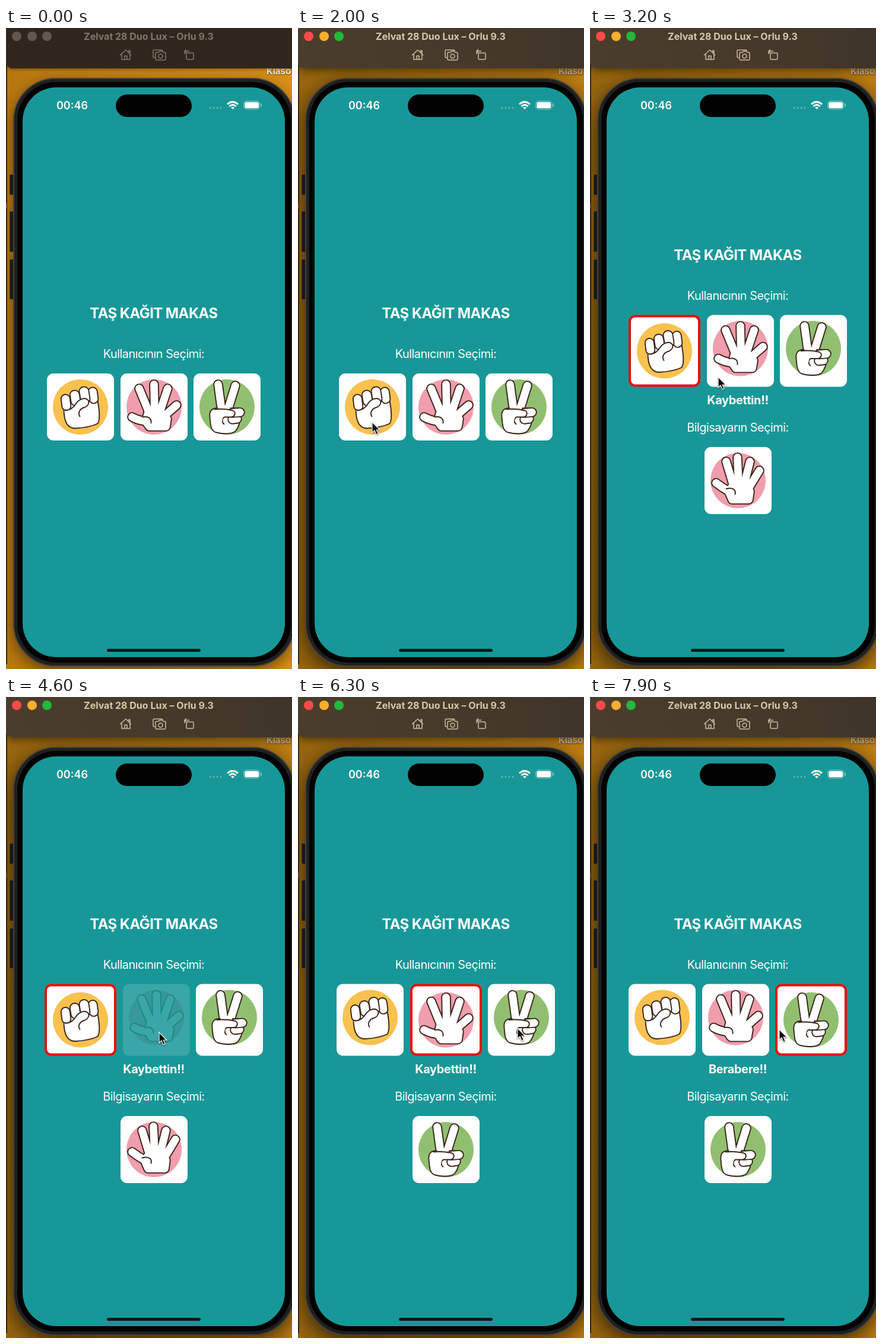
Write an HTML page that moves like this. It is 482 px wide and 1080 px high and loops after 8000 ms.

```html
<!DOCTYPE html>
<html lang="tr">
<head>
<meta charset="utf-8">
<title>Taş Kağıt Makas</title>
<style>
html, body { margin: 0; width: 100%; height: 100%; overflow: hidden; }
body { background: #000; font-family: Inter, sans-serif; color: #fff; }
#stage, #stage div, #stage > svg { position: absolute; }
#stage { width: 482px; height: 1080px; overflow: hidden; background: linear-gradient(90deg, #b77710, #d89119); }
#stage.active { background: linear-gradient(90deg, #98660f, #c28113); }
#edge { left: 0; top: 60px; width: 2px; height: 1012px; background: #3a2a1b; }
#mark { left: 0; top: 295px; width: 1px; height: 9px; background: #f0425a; }
#folder { left: 439px; top: 64px; font: 700 15px/18px Inter, sans-serif; color: #f1e9dc; text-shadow: 0 1px 2px #0009; }
.active #folder { color: #c9baa2; }

#bar { left: 0; top: 0; width: 490px; height: 68px; border-radius: 0 0 0 10px; background: #30261d; box-shadow: 0 1px 6px #0007; }
.active #bar { background: linear-gradient(90deg, #4b3d2c, #46392b 60%, #3f342a); box-shadow: 0 2px 16px #0009; }
#name { left: 131px; top: 4px; white-space: nowrap; font: 700 16px/20px Inter, sans-serif; color: #82776b; }
.active #name { color: #d9c8ad; }
.light { top: 6px; width: 16px; height: 16px; border-radius: 50%; background: #62584e; }
.active .light { background: var(--c); }
#tools { left: 0; top: 0; fill: none; stroke: #82776b; stroke-width: 1.5; stroke-linejoin: round; }
.active #tools { stroke: #cdbca2; }

.key { left: 6px; width: 9px; border-radius: 2px; background: #24221e; box-shadow: inset 1px 0 #45403a; }
#phone { left: 12px; top: 84px; width: 475px; height: 992px; box-sizing: border-box; border-radius: 72px; background: #000;
  border: 2px solid #45433f; box-shadow: inset 0 0 0 5px #202020, 0 8px 24px #0007; }
.active #phone { box-shadow: inset 0 0 0 5px #202020, 0 10px 36px #000a; }
#screen { left: 28px; top: 100px; width: 442px; height: 960px; border-radius: 57px; background: #189798; }
#island { left: 185px; top: 112px; width: 128px; height: 38px; border-radius: 19px; background: #000; }
#home { left: 170px; top: 1046px; width: 158px; height: 5px; border-radius: 3px; background: #091718; }
#clock { left: 85px; top: 120px; font: 600 18px/21px Inter, sans-serif; }

.text { left: 28px; width: 442px; text-align: center; white-space: nowrap; line-height: 30px; font-size: 20px; letter-spacing: -.55px; }
.bold { font-weight: 700; letter-spacing: -.4px; }
#title { top: 466px; font-size: 24px; letter-spacing: -.6px; }
#user, #reply { left: 0; top: 0; width: 482px; }
#row { left: 28px; top: 582px; width: 442px; display: flex; justify-content: center; gap: 10.5px; }
#stage .card { position: relative; padding: 10px; width: 93px; min-height: 93px; border-radius: 11px; background: #fff; }
#stage .card.on { border: 4px solid #f00808; }
#stage #answer { position: absolute; left: 192.5px; top: 705.5px; }
.card svg { display: block; width: 93px; height: 93px; overflow: visible; }
.ink { fill: #fff; stroke: #3a2319; stroke-width: 1.9; stroke-linecap: round; stroke-linejoin: round; }
.line { fill: none; }
.limbs { stroke-linecap: round; stroke-linejoin: round; }
.out { fill: #3a2319; stroke: #3a2319; stroke-width: 16.6; }
.in { fill: #fff; stroke: #fff; stroke-width: 12.8; }
#pointer { left: 0; top: 0; overflow: visible; filter: drop-shadow(0 1px 1px #0008); }
</style>
</head>
<body>
<svg width="0" height="0" style="position:absolute">
  <defs>
    <g id="spread"><path d="M-37 17Q-26 23-14 24M-25-31L-9 8M0-38L1 8M23-31L10 8M38-3L14 18"/><path d="M-10 10L12 10L22 20L20 33L-8 33L-14 24Z"/></g>
    <g id="fan"><path d="M-37 4Q-28 11-16 18M-20-32L-8 8M-1-39L1 8M20-32L10 8M36-17L16 16"/><path d="M-10 10L12 10L20 18L18 32L-10 32L-16 18Z"/></g>
    <path id="vee" d="M-15-38L-9 6M14-36L1 6"/>
    <path id="curl" d="M9 10L22 9"/>
    <path id="curl2" d="M9 21L17 20"/>

    <g id="rock">
      <circle r="46.5" fill="#f9c14f"/>
      <g class="ink">
        <path d="M-28 3C-28 21-24 36-9 36C9 35 19 33 29 28C33 22 32 6 29-10L-18-12Z"/>
        <rect x="14" y="-33" width="15" height="27" rx="7.3" transform="rotate(-8 21 -20)"/>
        <rect x="-1" y="-34" width="16" height="28" rx="7.5" transform="rotate(-9 7 -20)"/>
        <rect x="-17" y="-28" width="16" height="26" rx="7.5" transform="rotate(-9 -9 -16)"/>
        <rect x="-32" y="-21" width="15" height="27" rx="7.3" transform="rotate(-7 -25 -8)"/>
        <path d="M-28 6C-20 8-13 2-9-5C-4-13 5-16 11-13C17-9 14-2 7 1L3 4L4 12L-18 16Z" stroke="none"/>
        <path class="line" d="M-27 5C-18 7-11 0-8-5C-3-13 6-16 11-13C17-9 13-1 6 1C-1 3-5 10-1 16"/>
      </g>
    </g>
    <g id="paper">
      <circle r="46.5" fill="#f09dad"/>
      <g class="limbs"><use href="#spread" class="out"/><use href="#spread" class="in"/></g>
      <path class="ink line" d="M-19 17C-10 15-4 19-5 27"/>
    </g>
    <g id="palm">
      <circle r="46.5" fill="#f09dad"/>
      <g class="limbs"><use href="#fan" class="out"/><use href="#fan" class="in"/></g>
      <path class="ink line" d="M-20 14C-10 11-3 15-5 23"/>
    </g>
    <g id="scissors">
      <circle r="46.5" fill="#91bf70"/>
      <g class="limbs"><use href="#vee" class="out"/><use href="#vee" class="in"/></g>
      <path class="ink" d="M-18 2C-27 3-30 8-29 17C-28 28-28 41-18 43C-8 46 8 46 14 41C20 34 21 27 23 18L18 2Z"/>
      <path d="M-15-2H5V8H-15Z" fill="#fff"/>
      <g class="limbs"><use href="#curl2" class="out"/><use href="#curl2" class="in"/><use href="#curl" class="out"/><use href="#curl" class="in"/></g>
      <path class="ink" d="M-21 4C-10 3 2 4 10 6C16 9 13 17 7 17L-4 17C-9 19-9 26-5 29" />
      <path d="M-27 8C-22 4-16 5-12 7L-7 18L-10 30L-26 24Z" fill="#fff"/>
    </g>
  </defs>
</svg>

<div id="stage">
  <div id="edge"></div><div id="mark"></div>
  <div class="key" style="top:247px;height:34px"></div>
  <div class="key" style="top:309px;height:68px"></div>
  <div class="key" style="top:390px;height:67px"></div>
  <div id="phone"></div>
  <div id="folder">Klaso</div>
  <div id="bar">
    <div class="light" style="left:10px;--c:#ff4b49"></div>
    <div class="light" style="left:36px;--c:#fbae2b"></div>
    <div class="light" style="left:61px;--c:#23b83b"></div>
    <div id="name">Zelvat 28 Duo Lux – Orlu 9.3</div>
    <svg id="tools" width="482" height="68">
      <path d="M192 46L202 37L211 46M195 44V53H209V44M200 53V47H204V53M207 41V38H209V43"/>
      <path d="M251 50H250Q248 50 248 48V39Q248 37 250 37H262Q264 37 264 39"/>
      <path d="M254 41H257L259 39H263L265 41H267Q269 41 269 43V52Q269 54 267 54H254Q252 54 252 52V43Q252 41 254 41Z"/>
      <circle cx="260.5" cy="47.5" r="3.5"/>
      <rect x="304" y="42" width="12" height="11" rx="1.5"/>
      <path d="M301 44V41Q301 39 303 39H309M304 36L301 39L304 42"/>
    </svg>
  </div>

  <div id="screen"></div><div id="island"></div><div id="home"></div>
  <div id="clock">00:46</div>
  <svg width="482" height="160" style="left:0;top:0" fill="none" stroke="#fff">
    <path d="M344 134.5H365" stroke="#65b8b9" stroke-width="3" stroke-linecap="round" stroke-dasharray="0 6"/>
    <path d="M373 128.5Q382 120.5 391 128.5M376.3 132Q382 127 387.7 132" stroke-width="2.8"/>
    <path d="M379 134Q382 131.8 385 134L382 137Z" fill="#fff" stroke="none"/>
    <rect x="400.5" y="123" width="27.5" height="14" rx="4.5" stroke="#83c7c7"/>
    <rect x="402.3" y="124.8" width="23.9" height="10.4" rx="2.8" fill="#fff" stroke="none"/>
    <path d="M430.2 128V132" stroke="#83c7c7" stroke-width="1.6" stroke-linecap="round"/>
  </svg>

  <div id="user">
    <div id="title" class="text bold">TAŞ KAĞIT MAKAS</div>
    <div class="text" style="top:534px">Kullanıcının Seçimi:</div>
    <div id="row">
      <div class="card"><svg viewBox="-46.5 -46.5 93 93"><use href="#rock"/></svg></div>
      <div class="card"><svg viewBox="-46.5 -46.5 93 93"><use href="#paper"/></svg></div>
      <div class="card"><svg viewBox="-46.5 -46.5 93 93"><use href="#scissors"/></svg></div>
    </div>
  </div>
  <div id="reply">
    <div id="result" class="text bold" style="top:612px"></div>
    <div class="text" style="top:658px">Bilgisayarın Seçimi:</div>
    <div id="answer" class="card"><svg viewBox="-46.5 -46.5 93 93"><use id="pick"/></svg></div>
  </div>
  <svg id="pointer" width="14" height="22"><path d="M0 0V17.8L4 14L7 21L10.2 19.6L7.2 13H12.8Z" fill="#080808" stroke="#fff" stroke-width="1.2"/></svg>
</div>

<script>
const LOOP = 8000, STEP = 100, ACTIVE = 1900;
const $ = id => document.getElementById(id);
const cards = [...document.querySelectorAll('#row .card')];

const rounds = [
  { press: 2400, at: 2600, result: 'Kaybettin!!', pick: '#palm' },
  { press: 4600, at: 4800, result: 'Kaybettin!!', pick: '#scissors' },
  { press: 6500, at: 6700, result: 'Berabere!!', pick: '#scissors' }
];

// time, x, y of the pointer tip
const path = [
  [1400, -20, 722], [1900, 125, 664], [2700, 125, 664], [3200, 216, 588],
  [3800, 250, 567], [4400, 258, 565], [5500, 258, 565], [6300, 370, 558],
  [6400, 378, 565], [7600, 378, 565], [7700, 366, 550], [7800, 341, 549], [7900, 319, 560]
];

function pointerAt(t) {
  const i = path.findIndex(p => p[0] >= t);
  if (i < 0) return path[path.length - 1].slice(1);
  if (i === 0) return [-40, 722];
  const [a, b] = [path[i - 1], path[i]];
  const k = (t - a[0]) / (b[0] - a[0]), e = k * k * (3 - 2 * k);
  return [a[1] + (b[1] - a[1]) * e, a[2] + (b[2] - a[2]) * e];
}

function fade(t, { press, at }) {
  if (t < press) return 1;
  return t < at ? .15 : Math.min(1, .15 + .85 * (t - at) / 250);
}

function draw(t) {
  const chosen = rounds.filter(r => t >= r.at).length - 1;
  $('stage').classList.toggle('active', t >= ACTIVE);
  $('user').style.transform = chosen < 0 ? '' : 'translateY(-98.5px)';
  $('reply').style.visibility = chosen < 0 ? 'hidden' : 'visible';
  if (chosen >= 0) {
    $('result').textContent = rounds[chosen].result;
    $('pick').setAttribute('href', rounds[chosen].pick);
  }
  cards.forEach((card, i) => {
    card.classList.toggle('on', i === chosen);
    card.style.opacity = fade(t, rounds[i]);
  });
  const [x, y] = pointerAt(t);
  $('pointer').style.transform = `translate(${x}px, ${y}px)`;
}

const start = performance.now();
function tick() {
  const t = (performance.now() - start) % LOOP;
  draw(Math.floor(t / STEP) * STEP);
  requestAnimationFrame(tick);
}
tick();
</script>
</body>
</html>
```
